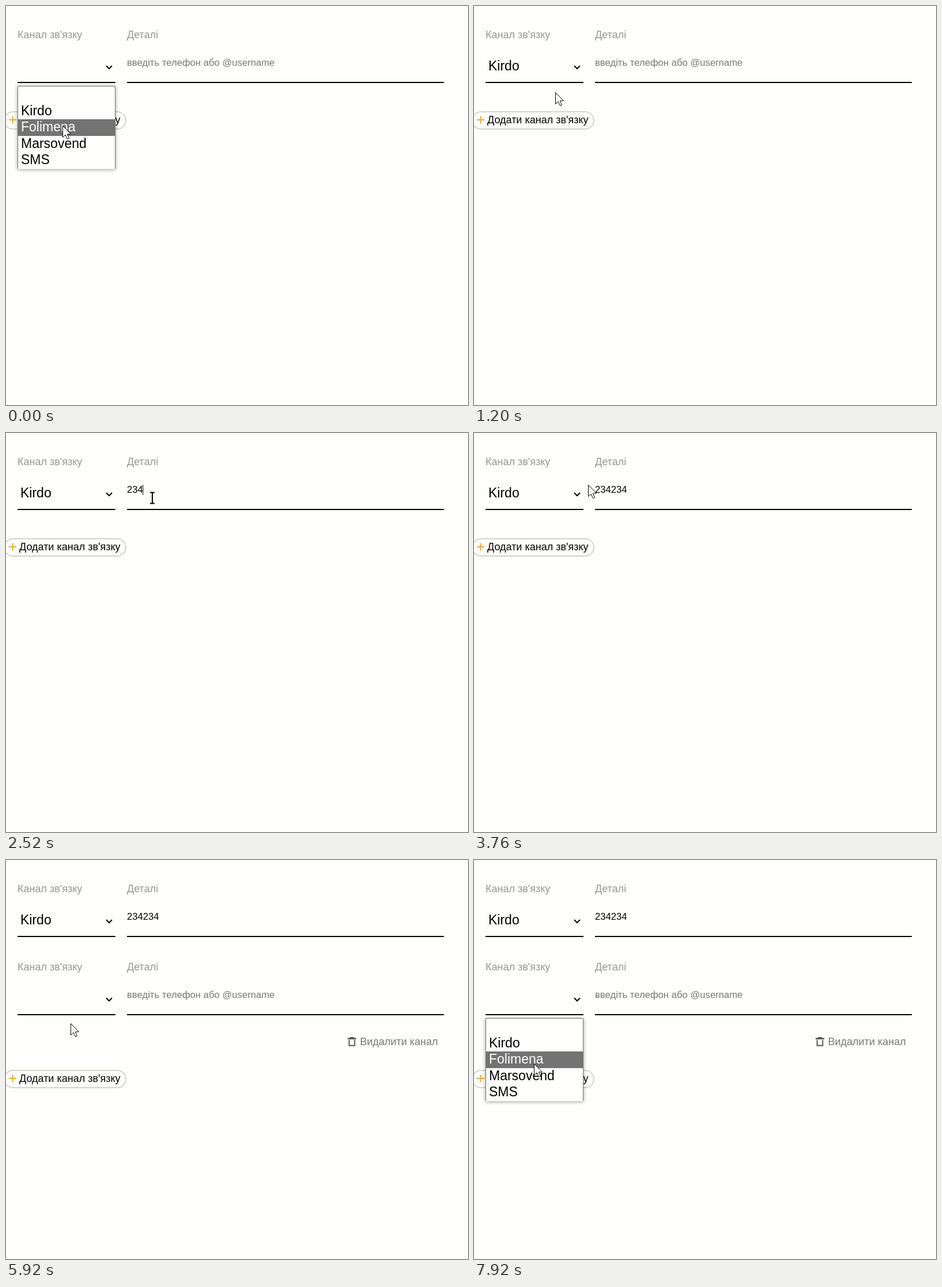
Recreate the animation shown at these times as an HTML page. Size 802 by 694 pixels, loop 8000 ms.

```html
<!DOCTYPE html>
<html lang="uk">
<head>
<meta charset="utf-8">
<style>
  html, body { margin: 0; width: 100%; height: 100%; overflow: hidden; background: #fefefc; }
  svg { display: block; width: 802px; height: 694px; font: 18px "Liberation Sans", Arial, sans-serif; }
  .label { fill: #969696; }
  .hint { fill: #777; }
  .field { font-size: 16.67px; }
  .big { font-size: 23px; }
  .line { fill: none; stroke: #000; stroke-width: 2; }
  #list { filter: drop-shadow(0 1px 3px #0006); }
</style>
</head>
<body>
<svg viewBox="0 0 802 694">
  <defs>
    <g id="row">
      <text class="label" x="20" y="56">Канал зв'язку</text>
      <text class="label" x="210" y="56">Деталі</text>
      <path class="line" d="M20 133h170M210 133h550M174 104l5 5 5-5"/>
    </g>
    <text id="hint" class="hint field" x="210" y="104">введіть телефон або @username</text>
  </defs>

  <use href="#row"/>
  <use href="#hint" id="empty"/>
  <text id="picked" class="big" x="25" y="112">Kirdo</text>
  <text id="typed" class="field" x="210" y="104"></text>
  <rect id="caret" y="90" width="1" height="18"/>

  <g id="second">
    <g transform="translate(0 136)"><use href="#row"/><use href="#hint"/></g>
    <path d="M593 309.5h4v-1.5h7v1.5h4v2.5h-15z" fill="#555"/>
    <path class="line" d="M595.7 313v9.7h9.6V313" style="stroke: #555"/>
    <text class="hint" x="614.5" y="322">Видалити канал</text>
  </g>

  <g id="add">
    <rect class="line" x="-3" y="184" width="211" height="30" rx="15" style="stroke: #d3d3cc"/>
    <path class="line" d="M5 198h13M11.5 191.5v13" style="stroke: #f2a72e"/>
    <text x="23" y="204">Додати канал зв'язку</text>
  </g>

  <g id="list">
    <rect x="20" y="139" width="170" height="144.5" fill="#fefefc"/>
    <path d="M20.5 283V139.5h169V283" fill="none" stroke="#767676"/>
    <rect id="mark" x="20" width="170" height="29" fill="#737373"/>
  </g>

  <path id="arrow" d="M.5.5v20l4.6-4.4 3.5 7.4 3-1.4-3.4-7.2h6.3z" fill="#fff" stroke="#000"/>
  <path id="beam" class="line" d="M-4-9.5h8M-4 9.5h8M0-9V9"/>
</svg>
<script>
  const LOOP = 8000, STEP = 40, ROW = 28.5;
  const PICK = 920, FOCUS = 1960, TYPE = 2160, KEY = 180, ADD = 4840, REOPEN = 6280;
  const $ = id => document.getElementById(id);
  const show = (id, on) => $(id).style.display = on ? '' : 'none';
  const move = (id, x, y) => $(id).setAttribute('transform', `translate(${x} ${y})`);

  const items = ['', 'Kirdo', 'Folimena', 'Marsovend', 'SMS'].map((name, i) => {
    const el = document.createElementNS('http://www.w3.org/2000/svg', 'text');
    el.textContent = name;
    el.setAttribute('class', 'big');
    el.setAttribute('x', 26);
    el.setAttribute('y', 161 + ROW * i);
    return $('list').appendChild(el);
  });

  // Each glide leaves from where the last one ended.
  const glides = [
    { from: 80, to: 440, x: 104, y: 274 },     // down the list
    { from: 440, to: 900, x: 112, y: 182 },    // back to the choice
    { from: 920, to: 1200, x: 141, y: 150 },
    { from: 1200, to: 1720, x: 254, y: 113 },  // into the field
    { from: 3440, to: 3760, x: 198, y: 90 },
    { from: 3760, to: 4080, x: 146, y: 201 },  // onto the button
    { from: 5320, to: 5680, x: 140, y: 371 },
    { from: 5680, to: 6040, x: 102, y: 253 },  // second select
    { from: 7000, to: 7520, x: 104, y: 354 }
  ];

  function pointer(t) {
    let x = 98, y = 208;
    for (const g of glides) {
      const k = Math.max(0, Math.min(1, (t - g.from) / (g.to - g.from)));
      const s = k * k * (3 - 2 * k);
      x += (g.x - x) * s;
      y += (g.y - y) * s;
    }
    return [Math.round(x), Math.round(y)];
  }

  function draw(t) {
    const [x, y] = pointer(t);
    const text = '234234'.slice(0, Math.max(0, Math.floor((t - TYPE) / KEY) + 1));
    const added = t >= ADD, dy = added ? 136 : 0;

    show('picked', t >= PICK);
    show('empty', !text);
    $('typed').textContent = text;
    $('caret').setAttribute('x', 209.5 + text.length * 9.27);
    show('caret', t >= FOCUS && t < 3440);

    show('second', added);
    move('add', 0, added ? 182 : 0);

    show('list', t < PICK || t >= REOPEN);
    move('list', 0, dy);
    const hot = Math.max(0, Math.min(4, Math.floor((y - dy - 140) / ROW)));
    $('mark').setAttribute('y', 140 + ROW * hot);
    items.forEach((el, i) => el.setAttribute('fill', i === hot ? '#fff' : '#000'));

    const inField = x > 208 && y > 84 && y < 134;
    show('arrow', !inField);
    show('beam', inField);
    move('arrow', x, y);
    move('beam', x, y);
  }

  const start = performance.now();
  function tick() {
    const t = (performance.now() - start) % LOOP;
    draw(Math.floor(t / STEP) * STEP);
    requestAnimationFrame(tick);
  }
  tick();
</script>
</body>
</html>
```
